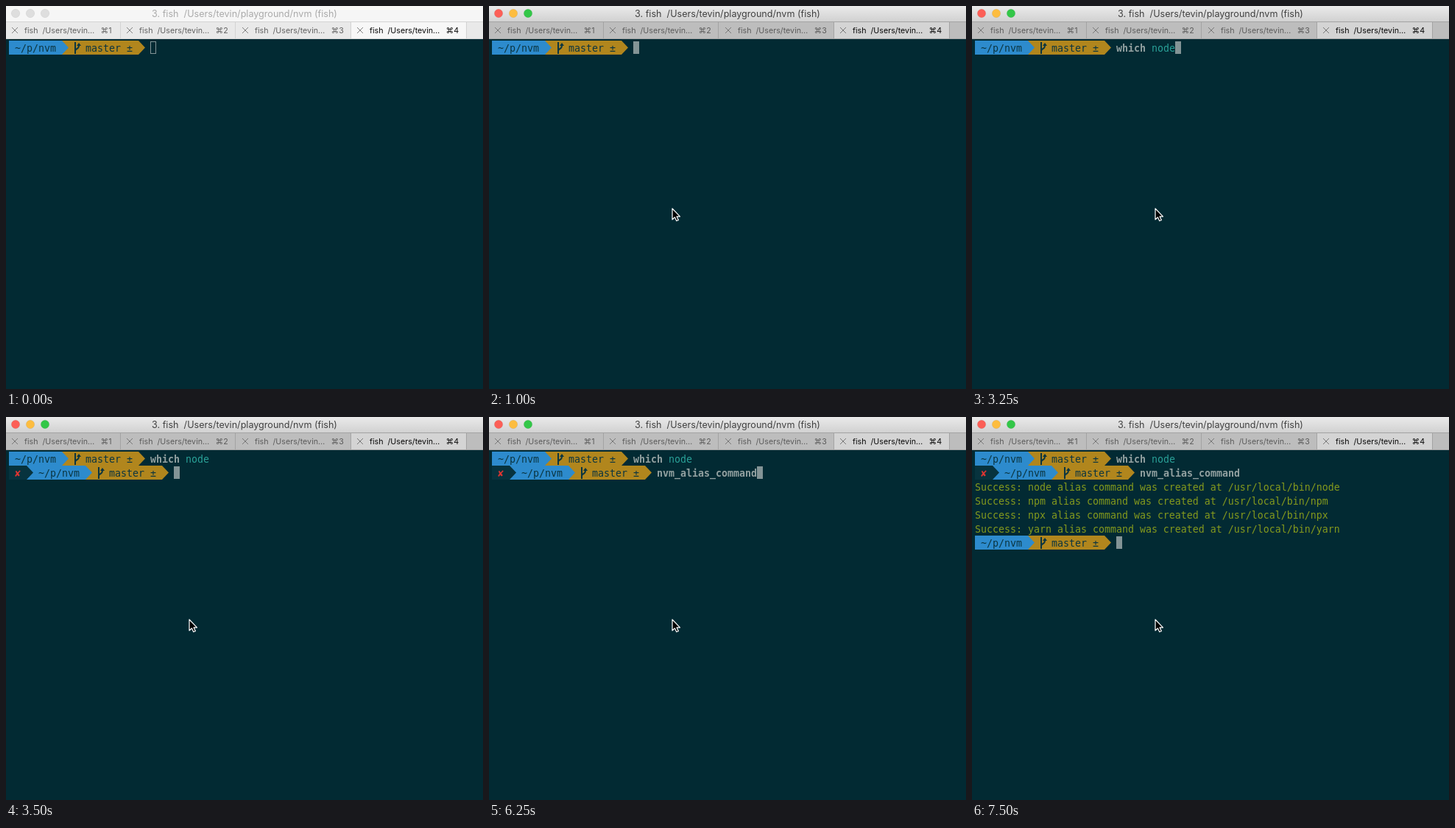
Recreate the animation shown at these times as an HTML page. Size 648x520 px, loop 8000 ms.

```html
<!DOCTYPE html>
<html lang="en">
<head>
<meta charset="utf-8">
<title>Terminal session</title>
<style>
  html, body { margin: 0; width: 100%; height: 100%; overflow: hidden; background: #022a33; }
  svg { display: block; }
  text { white-space: pre; }
  .ui { font-family: Inter, Roboto, sans-serif; font-size: 10.7px; }
  .title { font-size: 12.6px; text-anchor: middle; }
  .mono { font-family: "DejaVu Sans Mono", "Liberation Mono", monospace; font-size: 13.29px; }
  .bold { font-weight: bold; }
</style>
</head>
<body>
<svg id="stage" width="648" height="520" viewBox="0 0 648 520">
  <defs>
    <linearGradient id="bar" x2="0" y2="1">
      <stop stop-color="#eaeaea"/>
      <stop offset="1" stop-color="#d0d0d0"/>
    </linearGradient>
  </defs>
  <g id="screen"></g>
</svg>
<script>
const LOOP = 8000, CELL = 8, ROW = 19, LEFT = 4, TOP = 47;
const C = {
  blue: '#2d8bcd', gold: '#b1861d', ink: '#0b3540', dark: '#07333e', grey: '#93a1a1',
  cursor: '#839496', teal: '#2aa198', red: '#d2432b', hint: '#565c5c', green: '#859a1d'
};
const PATH = '/Users/tevin';
const COMMANDS = ['which', 'nvm', 'nvm_alias_command'];
const TOOLS = ['node', 'npm', 'npx', 'yarn'];

// [time, characters typed so far]
const FIRST = { text: 'which node', keys: [[0, 0], [2250, 2], [2500, 4], [2750, 6], [3000, 8], [3250, 10]] };
const SECOND = { text: 'nvm_alias_command', keys: [[0, 0], [4750, 2], [5000, 3], [5500, 4], [6250, 17]] };
const FOCUS = 1000, POINTER = 750, RUN_FIRST = 3500, RUN_SECOND = 6750, DONE = 7000;

const px = col => LEFT + col * CELL;
const py = row => TOP + row * ROW;
const rect = (x, y, w, h, fill) => `<rect x="${x}" y="${y}" width="${w}" height="${h}" fill="${fill}"/>`;
const label = (x, y, str, fill, cls = '') => `<text x="${x}" y="${y}" fill="${fill}" class="ui ${cls}">${str}</text>`;
const mono = (col, row, str, fill, cls = '') =>
  str && `<text x="${px(col)}" y="${py(row) + 15}" fill="${fill}" class="mono ${cls}">${str}</text>`;

function segment(col, row, cells, fill) {
  const x = px(col), y = py(row), w = cells * CELL;
  return `<path d="M${x} ${y}h${w}l9 ${ROW / 2}l-9 ${ROW / 2}h${-w}z" fill="${fill}"/>`;
}

function branch(col, row) {
  return `<g transform="translate(${px(col)} ${py(row)})" fill="none" stroke="${C.ink}" stroke-width="2">
    <path d="M2 2V18M2 14Q2 12 4.500 11Q7 10 7 6"/><path d="M4 7L7 3L10 7z" fill="${C.ink}" stroke="none"/></g>`;
}

function prompt(row, failed) {
  const s = failed ? 4 : 0;
  return segment(s + 9, row, 13, C.gold) + segment(failed ? 3 : 0, row, failed ? 10 : 9, C.blue) +
    (failed ? segment(0, row, 3, C.dark) + mono(1, row, '✘', '#dc3532') : '') +
    mono(s + 1, row, '~/p/nvm', C.ink) + branch(s + 11, row) +
    mono(s + 13, row, 'master ±', C.ink);
}

function cursor(col, row, solid = true) {
  const x = px(col), y = py(row) + 1;
  return solid ? rect(x, y, 8, 17, C.cursor)
    : `<rect x="${x + .5}" y="${y + .5}" width="7" height="16" fill="none" stroke="${C.cursor}"/>`;
}

function input(col, row, { text, keys }, t, editing) {
  const n = keys.filter(([at]) => at <= t).pop()[1];
  const typed = text.slice(0, n);
  const word = typed.split(' ')[0];
  const known = COMMANDS.includes(word);
  let out = mono(col, row, word, known ? C.grey : C.red, known ? 'bold' : '') +
    mono(col + word.length, row, typed.slice(word.length), C.teal);
  if (editing) {
    out += cursor(col + n, row, t >= FOCUS);
    if (n) out += mono(col + n, row, text.slice(n, n + 1), C.ink) + mono(col + n + 1, row, text.slice(n + 1), C.hint);
  }
  return out;
}

function chrome(focus, busy) {
  const job = busy ? 'nvm_alias_command' : 'fish';
  const line = focus ? '#a3a3a3' : '#d3d3d3';
  const lights = focus ? ['#fc5f57', '#fdbd40', '#33c748'] : Array(3).fill('#dedede');
  let out = rect(0, 0, 648, 22, focus ? 'url(#bar)' : '#f6f6f6') +
    rect(0, 22, 648, 23, focus ? '#bdbdbd' : '#e9e9e9') +
    rect(469, 22, 156, 23, focus ? '#d4d4d4' : '#f7f7f7') +
    rect(0, 21, 648, 1, line) + rect(0, 44, 648, 1, line);
  lights.forEach((fill, i) => {
    out += `<circle cx="${13 + 20 * i}" cy="10" r="5.700" fill="${fill}" stroke="#000" stroke-opacity=".09" stroke-width=".7"/>`;
  });
  out += label(324, 15, `3. ${job}  ${PATH}/playground/nvm (fish)`, focus ? '#414141' : '#aaa', 'title');
  for (let i = 0; i < 4; i++) {
    const x = Math.round(156.3 * i), current = i === 3;
    const fill = current ? '#080808' : focus ? '#5b5b5b' : '#626262';
    const name = current && busy ? 'nvm_alias_comm…' : `fish  ${PATH}…`;
    out += rect(x + (current ? 156 : 155), 22, 1, 22, line) +
      `<path d="M${x + 8} 29l8 8m0-8l-8 8" stroke="${focus ? '#777' : '#808080'}" fill="none"/>` +
      label(x + 25, 37, name, fill) + label(x + 128.5, 37, '⌘' + (i + 1), fill);
  }
  return out;
}

const pointer = `<path d="M249 275v15l3.400-3.200 2.300 5 2.600-1.200-2.300-4.800h4.500z"
  fill="#000" stroke="#fff" stroke-width="1.200" stroke-linejoin="round"/>`;

function draw(t) {
  let out = rect(0, 0, 648, 520, '#022a33') + chrome(t >= FOCUS, t >= RUN_SECOND && t < DONE);
  out += prompt(0) + input(24, 0, FIRST, t, t < RUN_FIRST);
  if (t >= RUN_FIRST) out += prompt(1, true) + input(28, 1, SECOND, t, t < RUN_SECOND);
  if (t >= RUN_SECOND) {
    TOOLS.forEach((tool, i) => {
      out += mono(0, i + 2, `Success: ${tool} alias command was created at /usr/local/bin/${tool}`, C.green);
    });
    out += t < DONE ? cursor(0, 6) : prompt(6) + cursor(24, 6);
  }
  return out + (t >= POINTER ? pointer : '');
}

const screen = document.getElementById('screen');
const start = performance.now();
let shown = '';
function tick() {
  const next = draw((performance.now() - start) % LOOP);
  if (next !== shown) screen.innerHTML = shown = next;
  requestAnimationFrame(tick);
}
tick();
</script>
</body>
</html>
```
